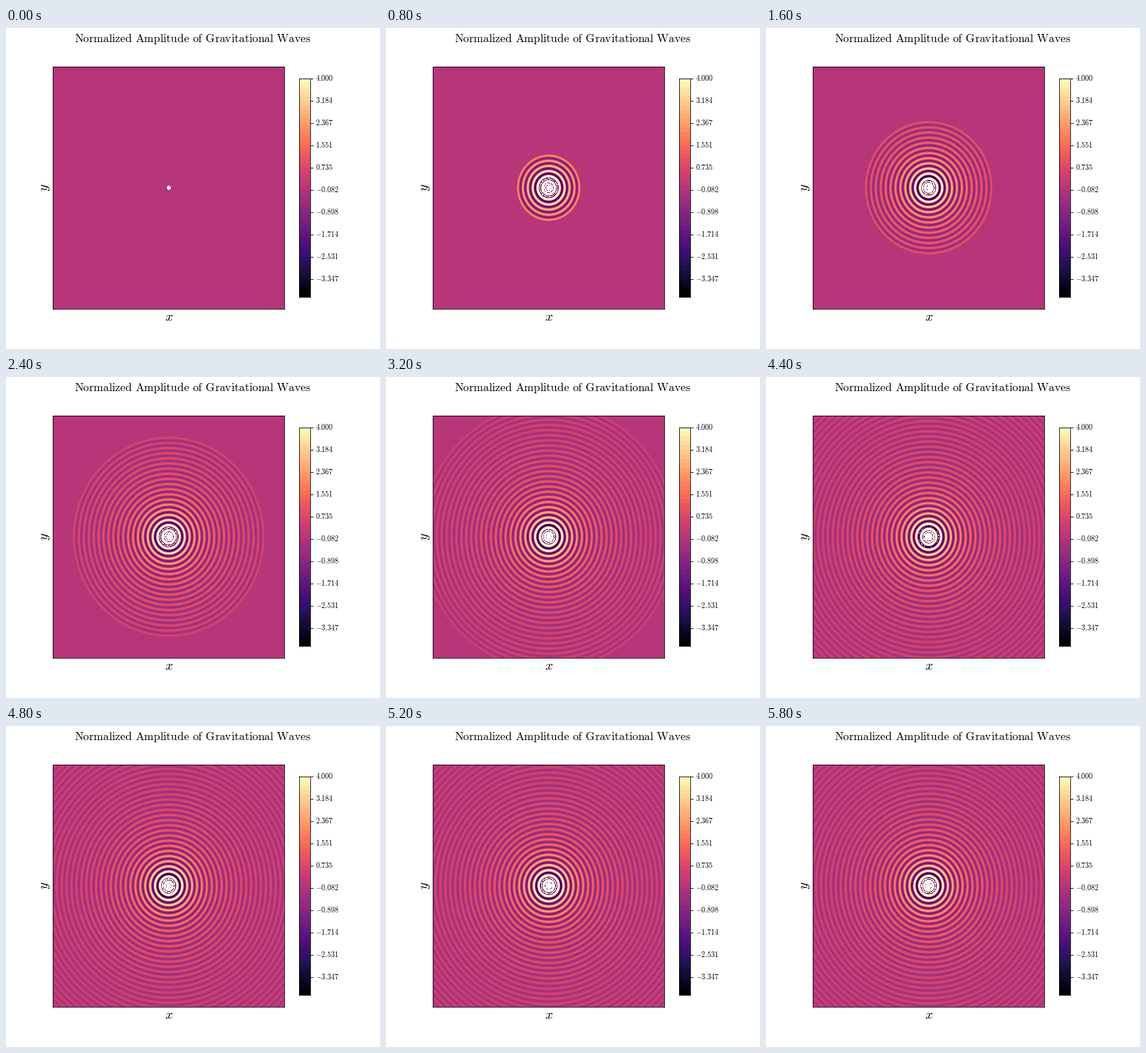
Write a matplotlib script that moves like this. It is 504 px wide and 432 px high and loops after 6 s.

```python
import numpy as np
import matplotlib.pyplot as plt
from matplotlib.animation import FuncAnimation
from matplotlib.colors import ListedColormap

W, H = 504, 432
FRAMES, LOOP = 30, 6000
HALF_W, HALF_H = 156.25, 163.1
CENTER = 219.25, 217     # pixels from the bottom left
WAVES = 23.58            # wavelengths from centre to the side
STRENGTH, BIAS = 0.46, 0.25
HOLE = 2.7 / HALF_W

plt.rcParams["mathtext.fontset"] = "cm"
fig = plt.figure(figsize=(W / 72, H / 72), dpi=72, facecolor="white")


def box(left, top, right, bottom):
    """Axes placed by pixel edges measured from the top left."""
    ax = fig.add_axes([left / W, 1 - bottom / H,
                       (right - left) / W, (bottom - top) / H])
    ax.set(xticks=[], yticks=[])
    return ax


def label(x, y, text, size, ha="center", va="baseline", **kw):
    fig.text(x / W, 1 - y / H, text, fontsize=size, ha=ha, va=va, **kw)


def roman(text):
    return r"$\mathrm{%s}$" % text.replace(" ", r"\hspace{0.38}")


levels = np.linspace(-4, 4, 50)
cmap = ListedColormap(plt.get_cmap("magma")((np.arange(49) + 0.5) / 49))
cmap.set_over("white")
cmap.set_under("white")
cmap.set_bad("white")

# Wave field, one sample per pixel
ax = box(63, 52, 375, 378)
px = (63.5 + np.arange(312) - CENTER[0]) / HALF_W
py = (54.5 + np.arange(326) - CENTER[1]) / HALF_H
r = np.hypot(*np.meshgrid(px, py))


def field(n):
    lag = 2 * n / (FRAMES - 1) - r
    wave = BIAS + np.sin(2 * np.pi * WAVES * lag)
    h = np.where(lag > 0, STRENGTH * wave / r, 0)
    return np.where(r < HOLE, np.nan, h)


img = ax.imshow(field(0), cmap=cmap, vmin=-4, vmax=4, origin="lower",
                interpolation="nearest", aspect="auto")

# Colour scale
bar = box(395, 68, 410, 362)
bar.imshow(((levels[1:] + levels[:-1]) / 2)[:, None], cmap=cmap, vmin=-4,
           vmax=4, origin="lower", extent=(0, 1, -4, 4),
           interpolation="nearest", aspect="auto")
bar.yaxis.tick_right()
ticks = levels[::-5]
bar.set_yticks(ticks, [""] * len(ticks))
for v in ticks:
    label(417, 218 - 36.75 * v, f"${v:.3f}$", 10, ha="left")

label(251.7, 19.3, roman("Normalized Amplitude of Gravitational Waves"), 15.5)
label(219.5, 394, "$x$", 18)
label(53, 214.5, "$y$", 18, va="center", rotation=90)


def update(n):
    img.set_data(field(n))
    return [img]


anim = FuncAnimation(fig, update, frames=FRAMES, interval=LOOP / FRAMES,
                     repeat=True, repeat_delay=0)
plt.show()
```
